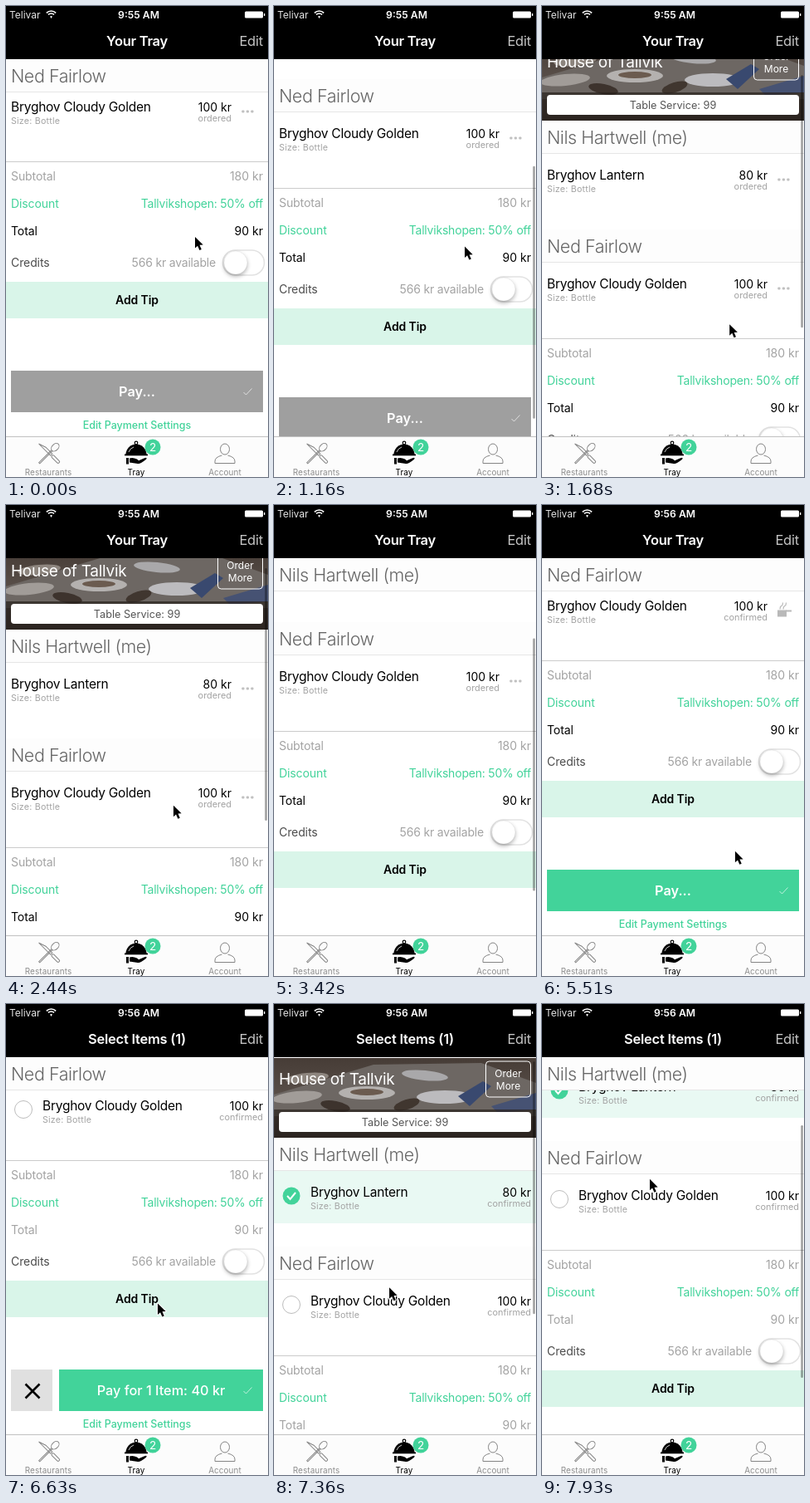
An HTML page with a canvas for the animation above (7.99 s loop, 316x567 px).

```html
<!DOCTYPE html>
<html lang="en">
<head>
<meta charset="utf-8">
<title>Your Tray</title>
<style>
html, body { margin: 0; width: 100%; height: 100%; overflow: hidden; background: #fff; }
canvas { display: block; width: 316px; height: 567px; }
</style>
</head>
<body>
<canvas id="stage"></canvas>
<script>
const W = 316, H = 567, LOOP = 7990;
const NAV = 64, TABS = 518, HEAD = 40, ROW = 63;
const GREEN = '#42d39a', MINT = '#d9f5e9', GRAY = '#a3a3a3', DARK = '#4c4c4c';

const canvas = document.getElementById('stage');
const c = canvas.getContext('2d');
const dpr = window.devicePixelRatio || 1;
canvas.width = Math.round(W * dpr);
canvas.height = Math.round(H * dpr);

// time, offset of the list from its bottom rest position
const scrollTrack = [
  [1100, 0], [1160, 32], [1230, 60], [1350, 130], [1600, 205], [1900, 236],
  [2380, 236], [2440, 225], [2620, 165], [2950, 115], [3420, 85], [3700, 20],
  [3900, 0], [6630, 0], [6690, 30], [6850, 130], [7050, 205], [7250, 236],
  [7400, 236], [7930, 109], [7990, 98]
];
// time, pointer tip x, y
const pointerTrack = [
  [60, 228, 278], [120, 214, 305], [290, 214, 305], [480, 204, 320],
  [800, 194, 240], [1050, 214, 228], [1160, 230, 289], [1400, 236, 430],
  [2000, 215, 330], [2380, 204, 373], [2440, 202, 362], [2620, 195, 310],
  [3000, 165, 470], [3250, 150, 575], [3450, 330, 580], [3620, 322, 420],
  [4180, 166, 332], [4390, 166, 332], [4600, 154, 323], [4850, 190, 358],
  [5160, 249, 366], [5400, 246, 400], [5790, 200, 459], [6030, 200, 459],
  [6390, 183, 360], [6630, 183, 360], [6850, 176, 460], [7250, 142, 345],
  [7400, 138, 340], [7930, 130, 211], [7990, 129, 201]
];

function at(track, t, k = 1) {
  if (t <= track[0][0]) return track[0][k];
  for (let i = 1; i < track.length; i++) {
    const a = track[i - 1], b = track[i];
    if (t <= b[0]) return a[k] + (b[k] - a[k]) * (t - a[0]) / (b[0] - a[0]);
  }
  return track[track.length - 1][k];
}
const clamp = v => Math.max(0, Math.min(1, v));
const smooth = (t, from, to) => {
  const u = clamp((t - from) / (to - from));
  return u * u * (3 - 2 * u);
};
const mix = (a, b, u) => a + (b - a) * u;

function rect(x, y, w, h, color) {
  c.fillStyle = color;
  c.fillRect(x, y, w, h);
}
function round(x, y, w, h, r) {
  c.beginPath();
  c.roundRect(x, y, w, h, r);
}
function oval(x, y, rx, ry, color, turn = 0) {
  c.beginPath();
  c.ellipse(x, y, rx, ry, turn, 0, Math.PI * 2);
  c.fillStyle = color;
  c.fill();
}
function shape(color, x, y, ...rest) {
  c.beginPath();
  c.moveTo(x, y);
  for (let i = 0; i < rest.length; i += 2) c.lineTo(rest[i], rest[i + 1]);
  c.closePath();
  c.fillStyle = color;
  c.fill();
}
function stroke(color, width) {
  c.strokeStyle = color;
  c.lineWidth = width;
  c.stroke();
}
function lines(color, width, ...paths) {
  c.beginPath();
  for (const p of paths) {
    c.moveTo(p[0], p[1]);
    for (let i = 2; i < p.length; i += 2) c.lineTo(p[i], p[i + 1]);
  }
  stroke(color, width);
}
// y is the middle of the capitals
function text(s, x, y, size, color, { weight = 400, align = 'left', gap = 0 } = {}) {
  c.font = `${weight} ${size}px Inter, "Liberation Sans", sans-serif`;
  c.letterSpacing = gap + 'px';
  c.textAlign = align;
  c.fillStyle = color;
  c.fillText(s, x, y + size * 0.36);
}
function faded(alpha, draw) {
  if (alpha <= 0) return;
  c.save();
  c.globalAlpha *= alpha;
  draw();
  c.restore();
}

function photo(y) {
  c.save();
  c.beginPath();
  c.rect(0, y, W, 96);
  c.clip();
  c.translate(0, y);
  const g = c.createLinearGradient(0, 0, 0, 96);
  g.addColorStop(0, '#463c36');
  g.addColorStop(0.5, '#5a504a');
  g.addColorStop(1, '#352d29');
  rect(0, 0, W, 96, g);
  shape('#6d6763', 0, 44, 120, 8, 250, 6, W, 30, W, 70, 0, 70);
  oval(40, 24, 26, 6, '#8d857e', -0.1);
  oval(28, 47, 30, 7, '#a19c98', -0.1);
  oval(112, 42, 34, 8, '#b4b1af');
  oval(112, 41, 20, 4, '#6b5b4f');
  oval(182, 21, 28, 6, '#a9a8aa', 0.1);
  oval(206, 47, 34, 8, '#bcbbbe');
  oval(160, 56, 16, 6, '#40362f', -0.3);
  oval(74, 58, 18, 6, '#3d332d', 0.2);
  shape('#39496f', 222, 46, 252, 28, 262, 34, 236, 58);
  shape('#465273', 262, 58, W, 42, W, 62, 270, 66);
  rect(0, 62, W, 34, 'rgba(40,33,29,.7)');
  c.restore();

  text('House of Tallvik', 6, y + 25, 19, '#fff', { gap: -0.25 });
  round(255.5, y + 4, 54, 43, 4);
  stroke('#fff', 1);
  text('Order', 282.5, y + 18.5, 12, '#fff', { align: 'center' });
  text('More', 282.5, y + 33.5, 12, '#fff', { align: 'center' });
  round(6, y + 65, 304, 24, 4);
  c.fillStyle = '#fff';
  c.fill();
  text('Table Service: 99', 158, y + 77, 12.7, '#555', { align: 'center' });
}

function header(name, y) {
  rect(0, y, W, HEAD, '#fdfdfd');
  rect(0, y + HEAD - 1, W, 1, '#e6e6e6');
  text(name, 6, y + 20.5, 21.5, '#666', { weight: 300, gap: -0.45 });
}

function potIcon(y) {
  rect(284, y, 11, 8, '#b9b9b9');
  rect(294, y, 7, 2, '#b9b9b9');
  lines('#b9b9b9', 1.2, [287, y - 1, 287.5, y - 4, 290, y - 6, 290.5, y - 9],
    [291, y - 1, 291.5, y - 4, 294, y - 6, 294.5, y - 9]);
}

function item(name, price, top, picked, s, confirmed) {
  if (picked && s > 0) faded(s, () => rect(0, top, W, ROW, '#e9f9f3'));
  faded(s, () => {
    c.beginPath();
    c.arc(21, top + 30, 10.5, 0, Math.PI * 2);
    if (picked) {
      c.fillStyle = GREEN;
      c.fill();
      lines('#fff', 2, [16, top + 30, 19.5, top + 34, 26, top + 26]);
    } else {
      c.fillStyle = '#fff';
      c.fill();
      stroke('#bdbdbd', 1);
    }
  });
  const x = mix(6, 44, s), right = mix(272, 310, s);
  text(name, x, top + 25.5, 15.5, '#000', { gap: -0.25 });
  text('Size: Bottle', x, top + 42, 10.7, GRAY, { gap: 0.2 });
  text(price, right, top + 26, 14, '#000', { align: 'right' });
  text(confirmed ? 'confirmed' : 'ordered', right, top + 39.5, 10.9, GRAY, { align: 'right' });
  faded(1 - s, () => {
    if (confirmed) potIcon(top + 30.5);
    else for (let i = 0; i < 3; i++) {
      round(284.3 + i * 5.5, top + 29.5, 3.2, 3, 1);
      c.fillStyle = '#c0c0c0';
      c.fill();
    }
  });
}

function toggle(y) {
  round(261.5, y - 15, 50, 30, 15);
  c.fillStyle = '#fff';
  c.fill();
  stroke('#e2e2e2', 1.5);
  c.save();
  c.shadowColor = 'rgba(0,0,0,.3)';
  c.shadowBlur = 5 * dpr;
  c.shadowOffsetY = 2.5 * dpr;
  oval(277, y, 14, 14, '#fff');
  c.restore();
  c.beginPath();
  c.arc(277, y, 14, 0, Math.PI * 2);
  stroke('rgba(0,0,0,.1)', 0.6);
}

function summary(d, s, confirmed) {
  const right = { align: 'right' }, mid = { align: 'center' };
  rect(0, d + 187, W, 1, '#cbcbcb');
  text('Subtotal', 6, d + 205, 14, GRAY, { gap: -0.1 });
  text('180 kr', 310, d + 205, 14, GRAY, right);
  text('Discount', 6, d + 238, 14, GREEN, { gap: -0.1 });
  text('Tallvikshopen: 50% off', 310, d + 238, 14, GREEN, { ...right, gap: -0.2 });
  const ink = Math.round(mix(0, 163, s));
  const total = `rgb(${ink},${ink},${ink})`;
  text('Total', 6, d + 271, 14, total, { gap: -0.1 });
  text('90 kr', 310, d + 271, 14, total, right);
  text('Credits', 6, d + 309, 14, DARK, { gap: -0.1 });
  text('566 kr available', 253, d + 309, 14, GRAY, { ...right, gap: -0.2 });
  toggle(d + 309);
  rect(0, d + 332, W, 44, MINT);
  text('Add Tip', 158, d + 354, 14, '#000', { ...mid, weight: 600, gap: -0.1 });

  const left = mix(6, 64, s);
  faded(s, () => {
    rect(left - 58, d + 439, 50, 50, '#e0e0e0');
    const x = left - 32, y = d + 465;
    lines('#000', 2.6, [x - 8.5, y - 8.5, x + 8.5, y + 8.5], [x + 8.5, y - 8.5, x - 8.5, y + 8.5]);
  });
  rect(left, d + 439, 310 - left, 50, confirmed ? GREEN : '#9f9f9f');
  const cx = (left + 310) / 2;
  faded(1 - s, () => text('Pay...', cx, d + 464, 16.3, '#fff', { ...mid, weight: 600 }));
  faded(s, () => text('Pay for 1 Item: 40 kr', cx, d + 464, 16.3, '#fff', { ...mid, weight: 500 }));
  lines('rgba(255,255,255,.65)', 1, [286.5, d + 465, 289.5, d + 468, 296.5, d + 460.5]);
  text('Edit Payment Settings', 158, d + 504, 12.5, GREEN, { ...mid, weight: 500 });
}

function navBar(t, s) {
  rect(0, 0, W, NAV, '#000');
  text('Telivar', 4, 10.5, 12, '#e4e4e4');
  for (let i = 0; i < 3; i++) {
    c.beginPath();
    c.arc(54.5, 14, 2 + i * 3, -Math.PI * 0.75, -Math.PI * 0.25);
    if (i) stroke('#fff', 1.7);
    else {
      c.lineTo(54.5, 15);
      c.fillStyle = '#fff';
      c.fill();
    }
  }
  text(t < 3900 ? '9:55 AM' : '9:56 AM', 160, 10.5, 12.2, '#fff', { weight: 600, align: 'center' });
  round(288, 6.5, 22, 8, 1.5);
  c.fillStyle = '#fff';
  c.fill();
  rect(311, 9, 1.3, 3, '#fff');
  const title = { weight: 600, align: 'center', gap: -0.25 };
  faded(1 - s, () => text('Your Tray', 158, 42.5, 16.5, '#fff', title));
  faded(s, () => text('Select Items (1)', 158, 42.5, 16.5, '#fff', title));
  text('Edit', 310, 42.5, 16.5, '#c4c4c4', { align: 'right', gap: -0.2 });
}

function cutlery() {
  const ink = '#858585';
  c.save();
  c.translate(51.5, 539);
  c.rotate(Math.PI / 4);
  c.beginPath();
  c.ellipse(0, -11, 3.8, 5.5, 0, 0, Math.PI * 2);
  stroke(ink, 1);
  lines(ink, 1, [-0.8, -5.5, -0.8, 16, 0.8, 16, 0.8, -5.5]);
  c.rotate(-Math.PI / 2);
  lines(ink, 1, [0, -17, 0, 3, 3, 3, 3, -8, 0, -17]);
  round(-0.5, 4.5, 3.4, 12, 1.5);
  stroke(ink, 1);
  c.restore();
}

function cloche() {
  c.fillStyle = '#000';
  c.beginPath();
  c.arc(157, 540, 12.5, Math.PI, 0);
  c.fill();
  c.beginPath();
  c.arc(157, 526, 1.8, 0, Math.PI * 2);
  stroke('#000', 1.2);
  rect(143, 539.5, 28, 1.8, '#000');
  rect(145, 544, 3, 7.5, '#000');
  c.beginPath();
  c.moveTo(149, 544.5);
  c.quadraticCurveTo(153, 543, 158, 545.5);
  c.lineTo(160, 547.2);
  c.lineTo(167, 544.2);
  c.quadraticCurveTo(171, 543, 169, 545.8);
  c.quadraticCurveTo(162, 551.5, 159, 551);
  c.lineTo(149, 549.5);
  c.fillStyle = '#000';
  c.fill();
  c.beginPath();
  c.arc(157, 540, 9.5, Math.PI * 1.1, Math.PI * 1.4);
  stroke('#fff', 0.8);
}

function person() {
  c.beginPath();
  c.ellipse(264, 533.5, 5.5, 6.5, 0, 0, Math.PI * 2);
  stroke('#858585', 1);
  c.beginPath();
  c.moveTo(260.5, 541);
  c.quadraticCurveTo(252, 543, 252, 548);
  c.lineTo(252, 550.5);
  c.lineTo(276, 550.5);
  c.lineTo(276, 548);
  c.quadraticCurveTo(276, 543, 267.5, 541);
  stroke('#858585', 1);
}

function tabBar() {
  rect(0, TABS, W, H - TABS, '#fcfcfc');
  rect(0, TABS, W, 1, '#c2c2c2');
  cutlery();
  cloche();
  person();
  oval(177, 531, 9.5, 9.5, GREEN);
  text('2', 177, 531, 13.5, '#fff', { align: 'center' });
  const label = { align: 'center', gap: 0.1 };
  text('Restaurants', 51, 561.3, 9.9, '#8c8c8c', label);
  text('Tray', 157, 561.3, 9.9, '#000', label);
  text('Account', 264, 561.3, 9.9, '#8c8c8c', label);
}

function scrollBar(t, d) {
  const alpha = t < 5000
    ? clamp((t - 1090) / 50) * clamp((4320 - t) / 350)
    : clamp((t - 6630) / 50);
  faded(alpha, () => {
    round(312.3, 212 - 0.605 * d, 2.5, 304, 1.25);
    c.fillStyle = 'rgba(0,0,0,.38)';
    c.fill();
  });
}

function pointer(x, y) {
  c.save();
  c.translate(x, y);
  c.beginPath();
  c.moveTo(0, 0);
  c.lineTo(0, 13.5);
  c.lineTo(3.1, 10.7);
  c.lineTo(5.4, 16);
  c.lineTo(7.8, 15);
  c.lineTo(5.5, 9.8);
  c.lineTo(9.7, 9.6);
  c.closePath();
  c.lineJoin = 'round';
  stroke('#fff', 2);
  c.fillStyle = '#000';
  c.fill();
  c.restore();
}

function draw(t) {
  const d = Math.round(at(scrollTrack, t));
  const s = smooth(t, 6030, 6390);
  const confirmed = t >= 3900;
  const firstHead = d - 75, secondHead = d + 56;
  // a header sticks below the bar until its own rows have passed
  const stick = y => Math.max(y, Math.min(NAV, y + ROW));

  c.setTransform(dpr, 0, 0, dpr, 0, 0);
  rect(0, 0, W, H, '#fff');
  photo(d - 171);
  item('Bryghov Lantern', '80 kr', firstHead + HEAD, true, s, confirmed);
  item('Bryghov Cloudy Golden', '100 kr', secondHead + HEAD, false, s, confirmed);
  summary(d, s, confirmed);
  header('Nils Hartwell (me)', stick(firstHead));
  header('Ned Fairlow', stick(secondHead));
  scrollBar(t, d);
  navBar(t, s);
  tabBar();
  pointer(at(pointerTrack, t, 1), at(pointerTrack, t, 2));
}

const start = performance.now();
function tick() {
  draw((performance.now() - start) % LOOP);
  requestAnimationFrame(tick);
}
tick();
</script>
</body>
</html>
```
